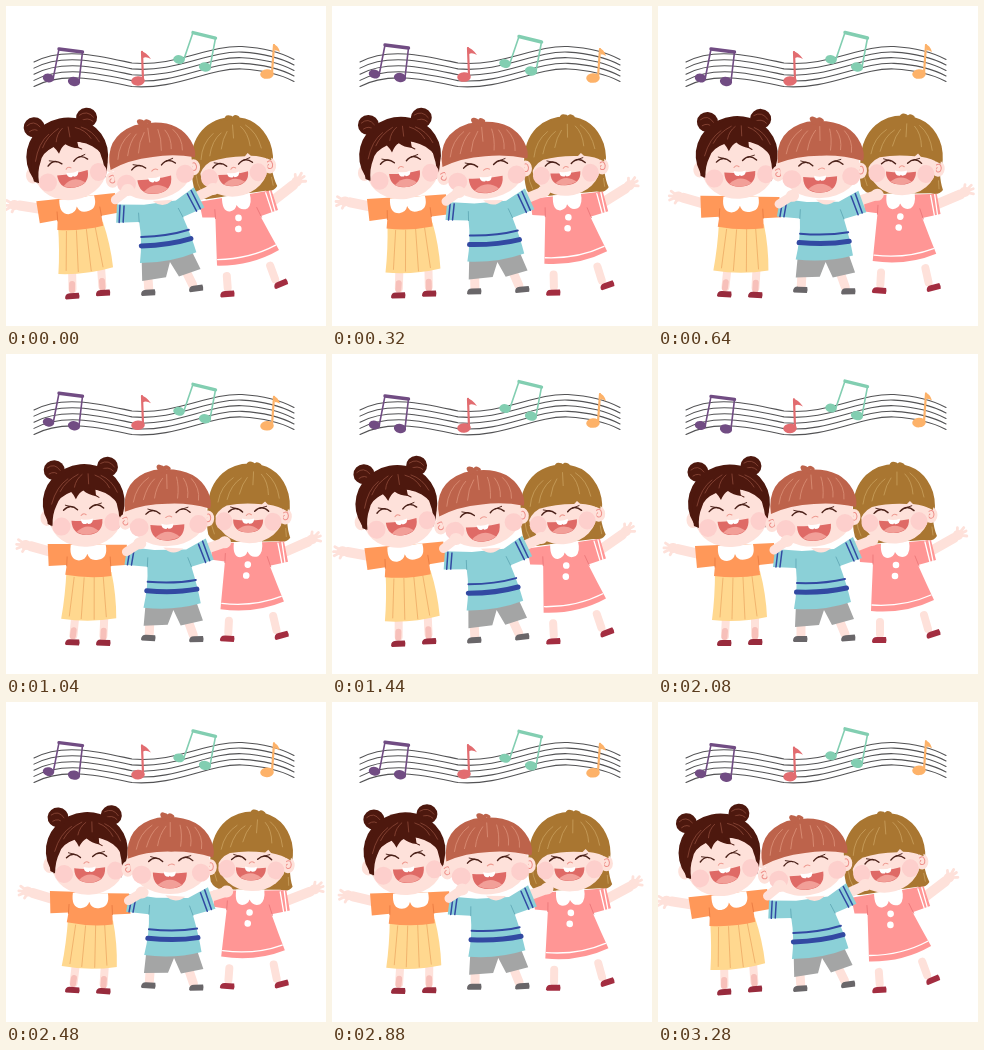
These frames come from a looping animation (320 px wide and 320 px high, 3.36 s). An HTML page:

```html
<!DOCTYPE html>
<html lang="en">
<head>
<meta charset="utf-8">
<title>Singing children</title>
<style>
html, body { margin: 0; width: 100%; height: 100%; overflow: hidden; background: #fff; }
svg { display: block; width: 100vw; height: 100vh; }
</style>
</head>
<body>
<svg id="stage" viewBox="0 0 320 320" fill="none" stroke-linecap="round" stroke-linejoin="round"></svg>
<script>
const SKIN = '#fee1da', BLUSH = '#fdcfcc', LINE = '#4a2018', RED = '#df6a66', TONGUE = '#f29f98';

const fill = (d, color) => `<path d="${d}" fill="${color}"/>`;
const line = (d, color, width = 1) => `<path d="${d}" stroke="${color}" stroke-width="${width}"/>`;
const oval = (x, y, rx, ry, color, tilt = 0) =>
  `<ellipse cx="${x}" cy="${y}" rx="${rx}" ry="${ry}" fill="${color}" transform="rotate(${tilt} ${x} ${y})"/>`;
const group = (id, body) => `<g id="${id}">${body}</g>`;
const place = (x, y, tilt, body) => `<g transform="translate(${x} ${y}) rotate(${tilt})">${body}</g>`;

const eye = (x, y, side, tilt) => place(x, y, tilt,
  `<g transform="scale(${side} 1)">` +
  line('M-7 2Q0 -5 7 2', LINE, 1.4) + line('M-5 -3L2 -1', LINE, .9) + '</g>');

const mouth = (x, y, w, h, tilt) => place(x, y, tilt,
  fill(`M${-w} 0Q0 2 ${w} 0Q${w} ${h} 0 ${h}Q${-w} ${h} ${-w} 0Z`, RED) +
  fill(`M${-w * .72} ${h * .78}Q0 ${h * .12} ${w * .72} ${h * .78}Q0 ${h * 1.2} ${-w * .72} ${h * .78}Z`, TONGUE) +
  fill('M-6 -1Q0 1 6 -1Q6 4.5 1 4.2L0 3.2L-1 4.2Q-6 4.5 -6 -1Z', '#fff'));

const ear = (x, y, curl) => oval(x, y, 6.5, 8, SKIN) +
  (curl ? line(`M${x - 3} ${y - 3}q5 -4 6 2q0 5 -4 4q-3 -2 0 -4`, '#ee8e88') : '');

const arm = (x1, y1, x2, y2, w = 10) => line(`M${x1} ${y1}L${x2} ${y2}`, SKIN, w);
const fingers = (x, y, tilt) => place(x, y, tilt,
  oval(0, 0, 5.5, 5, SKIN) + line('M0 0L8 -5M0 0L9 -1M0 0L8 4M-1 0L2 -7', SKIN, 2.8));

const shoe = (x, y, color, tilt = 0) => place(x, y, tilt,
  fill('M-7 2Q-7 -3 -2 -3L7 -3Q8 0 7 3L-6 3Z', color));
const strands = (d, color) => line(d, color, .7);

function bunGirl() {
  const hair = '#4d180e', light = '#96503f', shoes = '#982b3d';
  return arm(42, 200, 20, 195) + fingers(15, 194, 187) +
    arm(68, 262, 67, 282, 8) + arm(97, 262, 97, 281, 8) +
    line('M67 277L66.5 283M97 276L97 283', '#f7c0ba', 6) +
    shoe(66, 289, shoes) + shoe(97, 288, shoes) +
    fill('M57 218L102 217Q108 240 109 263Q82 269 54 266Q57 243 57 218Z', '#ffd88f') +
    line('M65 224L62 263M75 224L74 265M85 223L87 265M94 222L99 262', '#f0b06a', .9) +
    fill('M37 192L61 191L95 190L116 189L119 209L101 211L102 221Q80 225 56 222L57 212L39 214Z', '#ff9859') +
    line('M57 204L57 213M100 202L101 211', '#ea7c42', .9) +
    fill('M60 192Q59 207 69 207Q76 206 77 200Q80 208 89 205Q98 203 95 190Z', '#fff') +
    oval(40, 118, 10.5, 10, hair) + oval(93, 112, 10.5, 10, hair) +
    strands('M33 116Q40 110 46 118M35 122Q41 118 45 123M86 109Q94 104 100 112M87 115Q94 111 99 116', light) +
    ear(35, 166) + ear(113, 160) +
    oval(71, 149, 41, 38.5, hair, -8) +
    oval(73.5, 164, 36, 29, SKIN, -6) +
    fill('M36 172Q28 130 60 114Q98 106 110 139Q113 160 107 174Q108 160 105 152Q103 141 97 138Q90 137 82 135L83 142Q75 141 70 137Q66 139 63 146Q61 142 58 139Q46 144 44 153Q40 162 41 174Z', hair) +
    strands('M39 152Q43 134 54 126M47 139Q52 128 64 121M61 134Q62 126 68 121M87 121Q98 125 104 137M81 121Q91 124 96 133M74 120L75 130', light) +
    line('M76 135Q81 141 86 143', hair) +
    oval(50, 174, 9, 9, BLUSH) + oval(101, 167, 8.5, 9, BLUSH) +
    eye(58, 155, 1, -5) + eye(84, 152, -1, -5) +
    line('M69 162Q71 159 74 161', '#ee9a90') +
    mouth(75, 166, 15.5, 15, -6);
}

function bobGirl() {
  const hair = '#a97631', light = '#cda664', shoes = '#a32d40';
  return arm(222, 268, 222, 280, 8) + arm(266, 261, 270, 275, 8) +
    shoe(221, 286, shoes) + shoe(275, 280, shoes, -18) +
    group('wave', arm(273, 197, 296, 184) + fingers(300, 181, -20)) +
    fill('M197 183Q194 172 195 155Q195 134 208 121Q221 109 240 110Q266 112 275 138Q279 152 275 165Q276 175 279 182Q275 188 267 186L209 190Q201 190 197 183Z', hair) +
    fill('M200 192L222 190L251 188L273 186L278 206L260 211Q268 229 276 246Q247 260 213 257Q214 232 215 209L202 208Z', '#ff9695') +
    line('M214 251Q246 253 273 241', '#fff', 1.3) +
    line('M267 188L272 208M271 187L275 207', '#fff', 1.3) +
    line('M215 201L215 210M257 202L261 212', '#ec7779', .9) +
    fill('M223 189Q222 204 230 204Q236 203 237 198Q241 205 248 202Q253 198 251 187Z', '#fff') +
    oval(238, 211, 3.3, 3.3, '#fff') + oval(237, 222, 3.3, 3.3, '#fff') +
    ear(273, 161, true) +
    oval(237, 161, 34, 28.5, SKIN, -3) +
    fill('M197 165Q193 131 219 115Q248 104 268 127Q278 140 275 156Q266 151 255 150L252 147L249 150Q230 149 214 153Q204 158 201 170Z', hair) +
    line('M233 112Q233 108 238 110M240 112Q241 108 245 111', hair, 3) +
    strands('M205 150Q207 134 219 125M214 147Q217 132 227 125M226 141Q228 131 233 124M239 118L239 131M247 120Q254 127 255 140M252 119Q263 127 266 143M199 166Q199 174 203 182M274 173L275 181', light) +
    oval(212, 169, 8.5, 9, BLUSH) + oval(261, 167, 8.5, 9, BLUSH) +
    eye(223, 157, 1, -3) + eye(249, 155, -1, -3) +
    line('M234 162Q236 159 239 161', '#ee9a90') +
    mouth(236, 166, 15, 13, -3);
}

function boy() {
  const hair = '#bd634b', light = '#e0987f', navy = '#3249a2', shoes = '#696669';
  return arm(143, 263, 143, 281, 9) + arm(180, 263, 187, 280, 9) +
    shoe(142, 285, shoes) + shoe(190, 284, shoes, -4) +
    fill('M138 250L189 248L196 265L174 271L166 256L161 271L137 273Z', '#a4a5a5') +
    arm(194, 194, 212, 187) + oval(214, 186, 6.5, 6, SKIN) +
    fill('M117 195L144 197L176 195L195 183L204 204L182 212Q189 231 193 248Q166 257 136 255Q140 233 138 214L115 213Z', '#8bd0d7') +
    line('M120 196L118 213M124 197L122 213M192 186L200 205M188 189L196 207', navy, 1.5) +
    line('M139 229Q166 230 187 225', navy, 2) + line('M138.5 238Q167 239 188.5 234', navy, 5) +
    line('M138 205L138 214M178 203L182 212', '#62aab7', .9) +
    fill('M153 194Q163 203 173 194Z', SKIN) +
    ear(114, 170, true) + ear(196, 163, true) +
    oval(155.5, 162, 40, 30.5, SKIN, -5) +
    fill('M113 160Q108 127 140 117Q181 110 195 136Q200 146 198 153Q176 148 156 150Q132 151 113 160Z', hair) +
    line('M147 118Q141 111 148 114L151 118Q150 111 155 115', hair, 3.5) +
    strands('M121 150Q123 134 135 125M131 147Q134 133 141 126M142 145Q143 134 149 125M165 144Q166 132 163 123M175 143Q176 132 170 124M186 145Q187 133 178 124M153 121L154 135', light) +
    oval(128, 175, 9.5, 9, BLUSH) + oval(187, 169, 9, 9, BLUSH) +
    eye(141, 159, 1, -4) + eye(171, 156, -1, -4) +
    line('M154 164Q157 161 160 163', '#ee9a90') +
    mouth(156, 171, 17, 16, -4);
}

// The five lines run slightly closer together towards the right.
const staff = [0, 1, 2, 3, 4].map(i => {
  const at = (x, y) => `${x} ${y + i * (6.2 - x / 400)}`;
  return line(`M${at(28, 56)}C${at(58, 40)} ${at(98, 51)} ${at(126, 57)}` +
    `C${at(170, 61)} ${at(202, 39)} ${at(236, 40.5)}C${at(260, 42)} ${at(276, 47)} ${at(288, 53.5)}`, '#535355', 1.1);
}).join('');

const pair = (x1, y1, x2, y2, topX1, topY1, topX2, topY2, color) =>
  oval(x1, y1, 5.8, 4.4, color, 12) + oval(x2, y2, 6.2, 4.6, color, 12) +
  line(`M${x1 + 4.8} ${y1}L${topX1} ${topY1}M${x2 + 5} ${y2}L${topX2} ${topY2}`, color, 1.6) +
  line(`M${topX1} ${topY1}L${topX2} ${topY2}`, color, 3.4);
const single = (x, y, lean, color) => oval(x, y, 6.8, 4.8, color, -3) +
  line(`M${x + 5} ${y - 1}L${x + 4 + lean} ${y - 29}`, color, 2.2) +
  fill(`M${x + 3 + lean} ${y - 30}Q${x + 8 + lean} ${y - 29} ${x + 13} ${y - 22}Q${x + 8} ${y - 25} ${x + 5 + lean} ${y - 23}Z`, color);

const purpleRed = pair(42.5, 70, 68, 73.5, 53, 41, 76.5, 44, '#714c83') + single(132, 73, 0, '#e26c70');
const greenOrange = pair(173, 55.5, 199, 63, 187, 28.5, 209.5, 34, '#82ceb1') + single(261, 70, 3, '#fdb269');

document.getElementById('stage').innerHTML = staff +
  group('notesA', purpleRed) + group('notesB', greenOrange) +
  group('girlLeft', bunGirl()) + group('girlRight', bobGirl()) + group('boy', boy()) +
  group('hug', arm(116, 196, 126, 189, 9) + oval(129, 187, 6.5, 6, SKIN));

const move = (id, transform) => document.getElementById(id).setAttribute('transform', transform);
const LOOP = 3360, LAG = 18;

function draw(now) {
  const turn = 2 * Math.PI * ((now + LAG) % LOOP) / LOOP;
  const sway = -Math.cos(2 * turn);
  const bob = 2 * Math.cos(5 * turn);
  move('girlLeft', `rotate(${4 * sway} 82 290)`);
  move('hug', `rotate(${4 * sway} 82 290)`);
  move('boy', `rotate(${3.9 * sway} 166 286)`);
  move('girlRight', `rotate(${4.3 * sway} 247 285)`);
  move('wave', `rotate(${4 * sway} 272 197)`);
  move('notesA', `translate(0 ${bob})`);
  move('notesB', `translate(0 ${-bob})`);
}

const start = performance.now();
function tick() {
  draw(performance.now() - start);
  requestAnimationFrame(tick);
}
draw(0);
requestAnimationFrame(tick);
</script>
</body>
</html>
```
